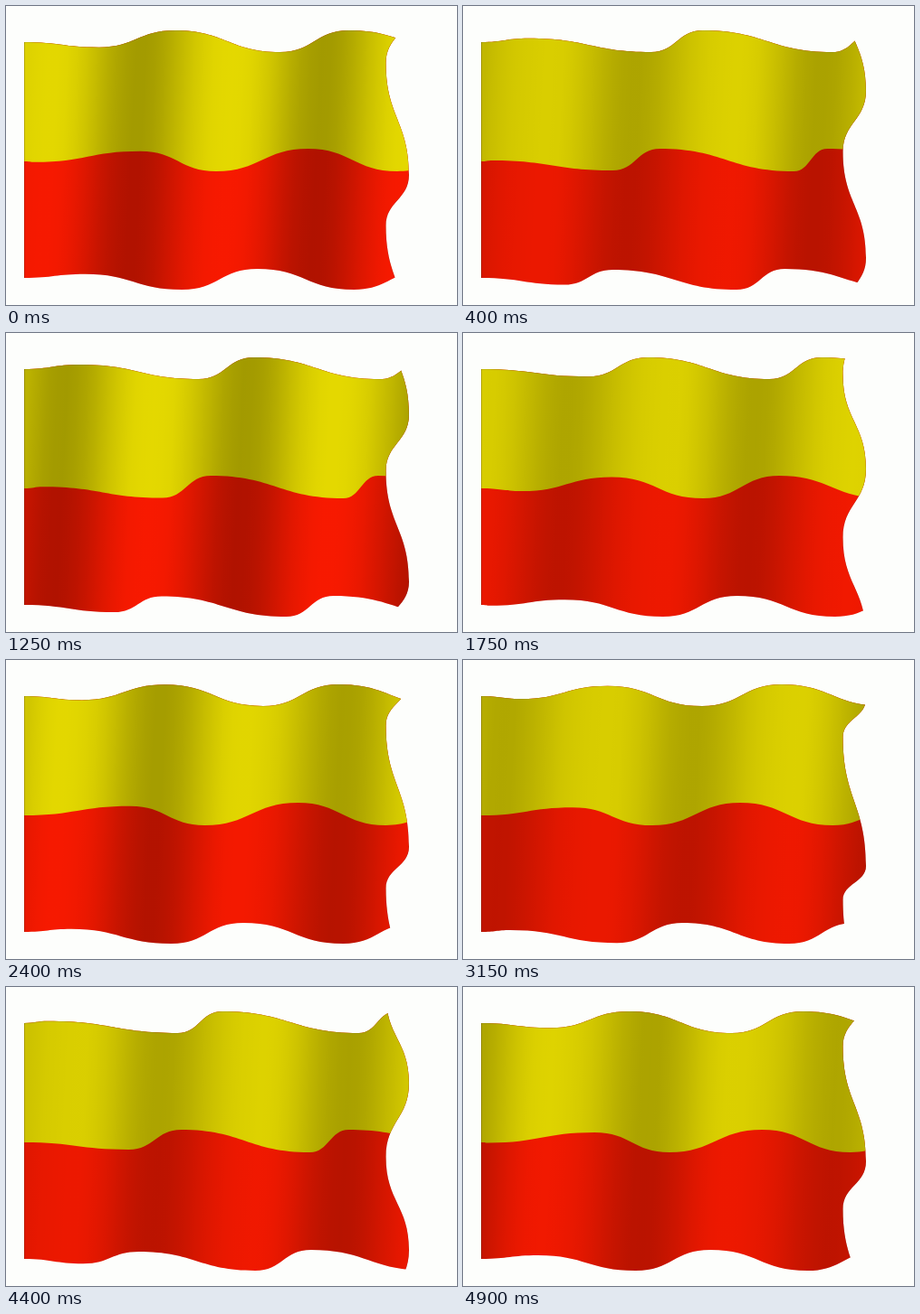
An HTML page with a canvas that plays this animation: 498x331 px, repeating every 4950 ms.

```html
<!DOCTYPE html>
<html lang="en">
<head>
<meta charset="utf-8">
<title>Waving flag</title>
<style>
html, body { margin: 0; overflow: hidden; background: #fdfefc; }
canvas { display: block; }
</style>
</head>
<body>
<canvas id="stage" width="498" height="331"></canvas>
<script>
const ctx = document.getElementById('stage').getContext('2d');
const WIDTH = 498, HEIGHT = 331, LEFT = 20;
const FRAMES = 99, STEP = 50, WAVES_PER_FRAME = 0.061;
const cycle = turns => Math.cos(2 * Math.PI * turns);

// A trough or crest moves `stride` px per wave, surging by `swing` px around phase `lag`.
const extremum = (start, stride, swing, lag, level) => u =>
  [start + stride * u + swing * cycle(u - lag), level];

// Waves grow out of the resting height at the pole.
const fromPole = (rest, feature) => u => {
  const [x, level] = feature(u), s = Math.max(LEFT, x);
  return [s, rest + (level - rest) * Math.min(1, (s - LEFT) / 160)];
};
const across = (rest, trough, crest) => [fromPole(rest, trough), fromPole(rest, crest)];

const edges = {
  top: across(40, extremum(106, 200, 11, .3, 51), extremum(179, 192, 11, .87, 27)),
  middle: across(172, extremum(50, 200, 18, .5, 183), extremum(138, 185, 13, .9, 158)),
  bottom: across(301, extremum(12, 190, 8, .55, 314), extremum(80, 190, 8, .05, 291)),
  fly: [extremum(246, -180, 9, .3, 419.5), extremum(186, -185, 15, .76, 445)]
};

// Joins the extrema with S-curves; `corners` close the outline into an area.
function area([trough, crest], phase, corners, vertical = false) {
  const points = [];
  for (let k = -2; k <= 3; k++) points.push(trough(phase + k), crest(phase + k));
  const xy = (s, d) => vertical ? [d, s] : [s, d];
  const path = new Path2D();
  path.moveTo(...xy(...points[0]));
  for (let i = 1; i < points.length; i++) {
    const [s0, d0] = points[i - 1], [s1, d1] = points[i], h = (s1 - s0) * .48;
    path.bezierCurveTo(...xy(s0 + h, d0), ...xy(s1 - h, d1), ...xy(s1, d1));
  }
  corners.forEach(corner => path.lineTo(...corner));
  path.closePath();
  return path;
}

function shading(frame) {
  const gradient = ctx.createLinearGradient(LEFT, 150, 450, 172);
  for (let i = 0; i <= 40; i++) {
    const x = LEFT + i * 430 / 40;
    const fold = .5 + .5 * cycle((x - 140 - 4.9 * frame) / 205);
    const ripple = .5 + .5 * cycle((x - 345) / 190 - frame * WAVES_PER_FRAME);
    const dark = .03 + .22 * fold ** 1.3 + .06 * ripple;
    gradient.addColorStop(i / 40, `rgba(0,0,0,${dark.toFixed(3)})`);
  }
  return gradient;
}

function draw(frame) {
  const phase = frame * WAVES_PER_FRAME % 1;
  const above = [[900, -50], [LEFT, -50]], below = [[900, 400], [LEFT, 400]];
  const top = area(edges.top, phase, below);
  const fly = area(edges.fly, phase, [[LEFT, -400], [LEFT, 700]], true);

  ctx.fillStyle = '#fdfefc';
  ctx.fillRect(0, 0, WIDTH, HEIGHT);
  ctx.save();
  ctx.clip(fly);
  ctx.clip(top);
  ctx.clip(area(edges.bottom, phase, above));
  ctx.fillStyle = '#ff1a00';
  ctx.fillRect(0, 0, WIDTH, HEIGHT);
  ctx.fillStyle = '#ebdf00';
  ctx.fill(area(edges.middle, phase, above));
  ctx.fillStyle = shading(frame);
  ctx.fillRect(0, 0, WIDTH, HEIGHT);
  ctx.strokeStyle = 'rgba(70,40,0,.25)';
  ctx.stroke(top);
  ctx.stroke(fly);
  ctx.restore();
}

function tick() {
  draw(Math.floor(performance.now() / STEP) % FRAMES);
  requestAnimationFrame(tick);
}
tick();
</script>
</body>
</html>
```
